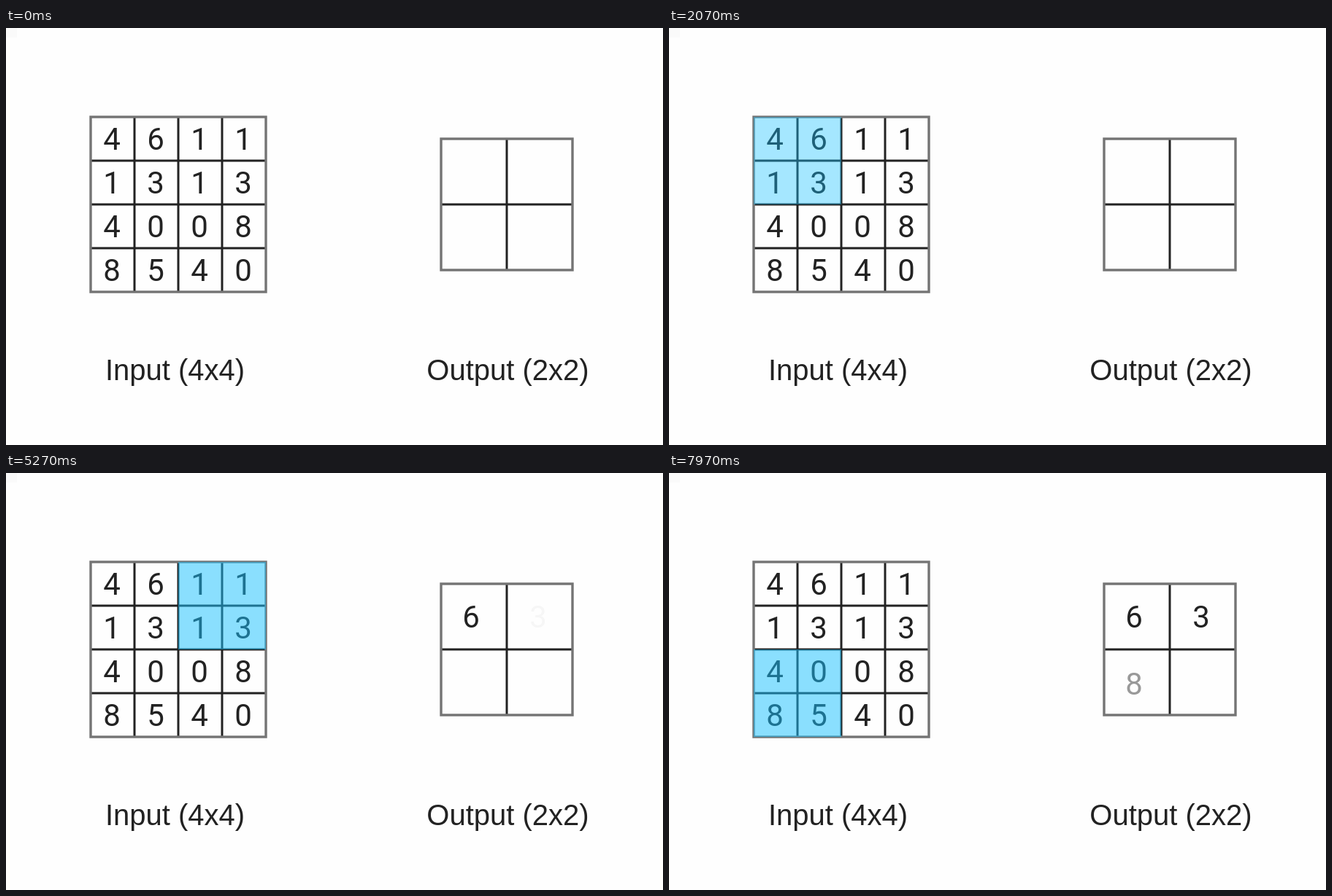
Animation, 900 px wide and 572 px high, one loop 8 s. Source, as an HTML page with a canvas:

```html
<!DOCTYPE html>
<html lang="en">
<head>
<meta charset="utf-8">
<title>2x2 max pooling</title>
<style>
  html, body { margin: 0; width: 100%; height: 100%; overflow: hidden; background: #fefefe; }
  canvas { display: block; filter: blur(0.5px); }
</style>
</head>
<body>
<canvas id="stage" width="900" height="572"></canvas>
<script>
const ctx = document.getElementById('stage').getContext('2d');
const LOOP = 8000;
const INK = '#222';
const DIGIT_FONT = '42px Roboto, sans-serif';
const LABEL_FONT = '40px "Liberation Sans", Arial, sans-serif';
const CELLS = ['4611', '1313', '4008', '8540'];
const OUTPUTS = [
  { text: '6', x: 637, y: 212, start: 2780 },
  { text: '3', x: 729, y: 212, start: 5255 },
  { text: '8', x: 637, y: 304, start: 7765 }
];

const progress = (t, start, duration) => Math.min(1, Math.max(0, (t - start) / duration));
const ease = p => (1 - Math.cos(Math.PI * p)) / 2;

function write(text, x, y, font) {
  ctx.font = font;
  ctx.fillStyle = INK;
  ctx.fillText(text, x, y);
}

function grid(x, y, cell, count) {
  const size = cell * count;
  ctx.strokeStyle = INK;
  ctx.lineWidth = 3;
  ctx.beginPath();
  for (let i = 1; i < count; i++) {
    ctx.moveTo(x + i * cell, y);
    ctx.lineTo(x + i * cell, y + size);
    ctx.moveTo(x, y + i * cell);
    ctx.lineTo(x + size, y + i * cell);
  }
  ctx.stroke();
  ctx.strokeStyle = '#747474';
  ctx.lineWidth = 3.4;
  ctx.strokeRect(x, y, size, size);
}

function draw(t) {
  ctx.fillStyle = '#fefefe';
  ctx.fillRect(0, 0, 900, 572);
  ctx.fillStyle = '#fafafa';
  ctx.fillRect(0, 0, 15, 13);
  ctx.textAlign = 'center';

  grid(116, 122, 60, 4);
  grid(596, 152, 90, 2);
  CELLS.forEach((row, r) => [...row].forEach((digit, c) =>
    write(digit, 145 + c * 60, 166.5 + r * 60, DIGIT_FONT)));
  write('Input (4x4)', 231.5, 482.5, LABEL_FONT);
  write('Output (2x2)', 687.5, 482.5, LABEL_FONT);

  // Pooling window: fades in, slides right, then down to the left.
  const right = ease(progress(t, 3680, 1150));
  const down = ease(progress(t, 5990, 1300));
  ctx.globalAlpha = 0.5 * progress(t, 1335, 950);
  ctx.fillStyle = 'rgb(24,194,255)';
  ctx.fillRect(116 + 120 * (right - down), 122 + 120 * down, 120, 120);

  for (const { text, x, y, start } of OUTPUTS) {
    ctx.globalAlpha = progress(t, start, 450);
    write(text, x, y, DIGIT_FONT);
  }
  ctx.globalAlpha = 1;
}

function tick() {
  draw(performance.now() % LOOP);
  requestAnimationFrame(tick);
}
tick();
</script>
</body>
</html>
```
